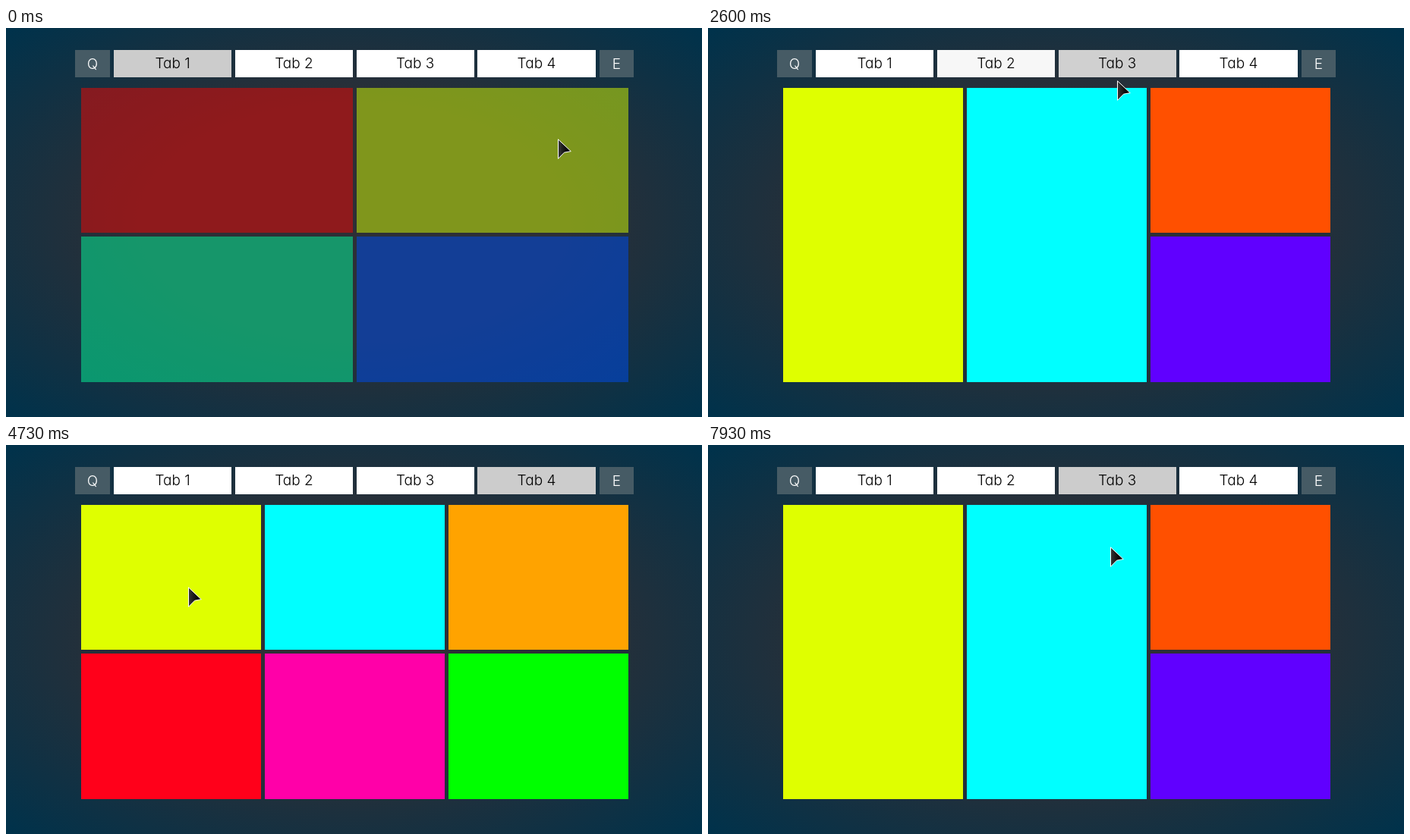
Animation of 917 by 513 pixels, one loop 8 s. Source, as an HTML page:

```html
<!DOCTYPE html>
<html lang="en">
<head>
<meta charset="utf-8">
<title>Tabs</title>
<style>
  html, body { margin: 0; width: 100%; height: 100%; overflow: hidden; background: #00324b; }
  svg { display: block; width: 100vw; height: 100vh; }
  text {
    font-family: Inter, Lato, sans-serif;
    font-size: 19px;
    font-weight: 300;
    font-feature-settings: "cv11";
    text-anchor: middle;
  }
</style>
</head>
<body>
<svg viewBox="0 0 917 513">
  <defs>
    <radialGradient id="glow" r=".7">
      <stop offset=".43" stop-color="#2d2f36"/>
      <stop offset="1" stop-color="#00324b"/>
    </radialGradient>
    <linearGradient id="ink">
      <stop offset="0" stop-color="#383838"/>
      <stop offset=".6" stop-color="#0c0c0c"/>
    </linearGradient>
  </defs>
  <rect width="917" height="513" fill="url(#glow)"/>
  <g id="views"></g>
  <g id="bar"></g>
  <path id="cursor" d="M.5 .8L17.3 16.6L8.5 18.2L.5 26.4Z" fill="url(#ink)" stroke="#fff"/>
</svg>
<script>
const LOOP = 8000, TICK = 1000 / 15, FADE = 4;
const LEFT = 99, TOP = 78.9, WIDTH = 721, HEIGHT = 388, GAP = 5;
const BAR_TOP = 29, BAR_HEIGHT = 36, TAB_LEFT = 142, TAB_WIDTH = 155.2, TAB_STEP = 159.8;
const NORMAL = 255, HOVER = 230, SELECTED = 204;
const $ = id => document.getElementById(id);

function add(parent, tag, attrs, text) {
  const el = document.createElementNS("http://www.w3.org/2000/svg", tag);
  for (const key in attrs) el.setAttribute(key, attrs[key]);
  if (text) el.textContent = text;
  return parent.appendChild(el);
}

// A rectangle with its edges snapped to whole pixels.
function box(parent, left, top, w, h, fill) {
  const x = Math.round(left), y = Math.round(top);
  const width = Math.round(left + w) - x, height = Math.round(top + h) - y;
  return add(parent, "rect", { x, y, width, height, fill });
}

// Each view is a row of columns; each column stacks its colours.
const VIEWS = [
  [["#d00c0a", "#07da8c"], ["#b7da0a", "#0248d5"]],
  [["#9500ff"], ["#dfff00"], ["#00ffca"], ["#002fff"], ["#00ff00"]],
  [["#dfff00"], ["#00ffff"], ["#ff5000", "#6000ff"]],
  [["#dfff00", "#ff001a"], ["#00ffff", "#ff00a8"], ["#ffa300", "#00ff00"]]
];

const views = VIEWS.map((columns, n) => {
  const group = add($("views"), "g", { "fill-opacity": n ? 1 : 0.6 });
  const stepX = (WIDTH + GAP) / columns.length;
  columns.forEach((colours, c) => {
    const stepY = (HEIGHT + GAP) / colours.length;
    colours.forEach((fill, r) =>
      box(group, LEFT + c * stepX, TOP + r * stepY, stepX - GAP, stepY - GAP, fill));
  });
  return group;
});

for (const [label, x, width] of [["Q", 91, 46], ["E", 782, 45]]) {
  box($("bar"), x, BAR_TOP, width, BAR_HEIGHT, "#465b65");
  add($("bar"), "text", { x: x + width / 2, y: 54, fill: "#fff" }, label);
}

const tabX = n => TAB_LEFT + n * TAB_STEP;
const tabs = VIEWS.map((_, n) => {
  const tab = box($("bar"), tabX(n), BAR_TOP, TAB_WIDTH, BAR_HEIGHT);
  add($("bar"), "text", { x: tabX(n) + TAB_WIDTH / 2, y: 53 }, "Tab " + (n + 1));
  return tab;
});

// Time is counted in ticks of 1/15 s: [tick, view] and [tick, x, y].
const SWITCHES = [[24, 1], [37, 2], [55, 3], [114, 2]];
const STOPS = [
  [4, 727, 146], [17, 381, 92], [24, 346, 49], [36, 520, 48], [42, 560, 90],
  [48, 730, 62], [55, 745, 48], [58, 763, 58], [65, 450, 276], [69, 303, 246],
  [71, 240, 187], [77, 117, 48], [78, 117, 48], [81, 122, 76], [86, 497, 80],
  [91, 240, 60], [92, 250, 56], [93, 673, 70], [98, 824, 46], [104, 808, 50],
  [112, 775, 79], [113, 775, 79], [117, 720, 136], [119, 530, 134]
];

function activeView(t) {
  return SWITCHES.reduce((view, [tick, next]) => t >= tick ? next : view, 0);
}

// Slope at a stop, flat at turning points so the curve never overshoots.
function slope(i, axis) {
  if (i === 0 || i === STOPS.length - 1) return 0;
  const rate = j => (STOPS[j + 1][axis] - STOPS[j][axis]) / (STOPS[j + 1][0] - STOPS[j][0]);
  const a = rate(i - 1), b = rate(i);
  return a * b > 0 ? 2 * a * b / (a + b) : 0;
}

function cursorAt(t) {
  let i = 0;
  while (i < STOPS.length - 2 && t >= STOPS[i + 1][0]) i++;
  const a = STOPS[i], b = STOPS[i + 1], span = b[0] - a[0];
  const u = Math.min(1, Math.max(0, (t - a[0]) / span)), v = 1 - u;
  return [1, 2].map(axis =>
    a[axis] * v * v * (1 + 2 * u) + b[axis] * u * u * (1 + 2 * v) +
    span * u * v * (slope(i, axis) * v - slope(i + 1, axis) * u));
}

function isHovered(n, t) {
  const [x, y] = cursorAt(t);
  return x >= tabX(n) && x < tabX(n) + TAB_WIDTH && y >= BAR_TOP && y < BAR_TOP + BAR_HEIGHT;
}

// Hover shows one tick late; selection fades over a few ticks.
function tabGrey(n, t) {
  let share = 0;
  for (let k = 0; k < FADE; k++) if (activeView(t - k) === n) share += 1 / FADE;
  const eased = share * share * (3 - 2 * share);
  const base = isHovered(n, t - 1) ? HOVER : NORMAL;
  return Math.round(base + (SELECTED - base) * eased);
}

function draw(ms) {
  const t = Math.floor((ms % LOOP + 4) / TICK) % 120;
  const active = activeView(t);
  views.forEach((view, n) => view.setAttribute("visibility", n === active ? "visible" : "hidden"));
  tabs.forEach((tab, n) => {
    const g = tabGrey(n, t);
    tab.setAttribute("fill", `rgb(${g},${g},${g})`);
  });
  const [x, y] = cursorAt(t).map(Math.round);
  $("cursor").setAttribute("transform", `translate(${x} ${y})`);
}

const start = performance.now();
function loop() {
  draw(performance.now() - start);
  requestAnimationFrame(loop);
}
loop();
</script>
</body>
</html>
```
